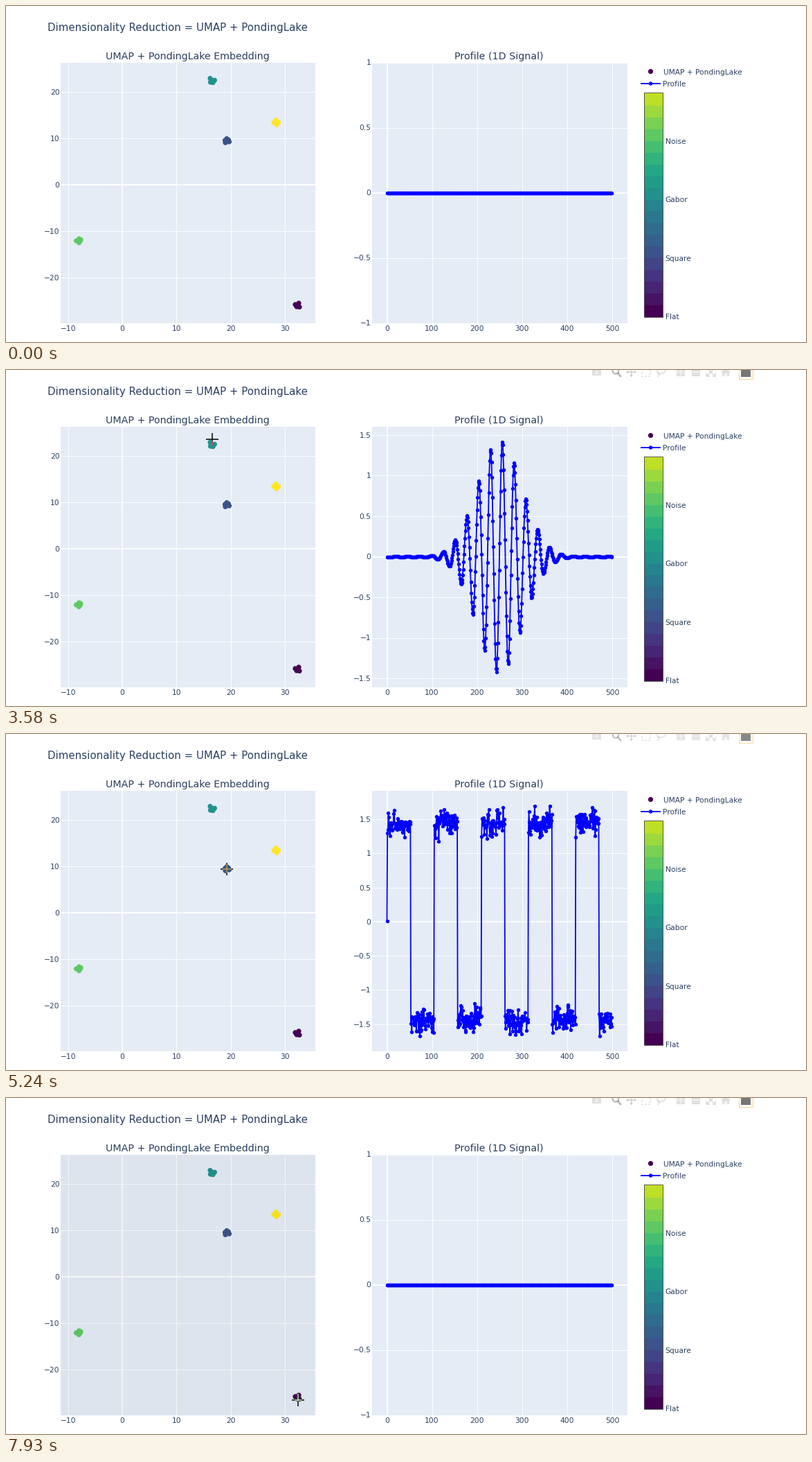
These frames come from a looping animation (1156 px wide and 485 px high, 8 s). A matplotlib script:

```python
import numpy as np
import matplotlib.pyplot as plt
from matplotlib.animation import FuncAnimation
from matplotlib.patches import Circle, Ellipse, Polygon, Rectangle
from matplotlib.path import Path

W, H, DPI = 1156, 485, 64  # a power of two keeps the pixel size exact
LOOP, STEP = 8000, 40
PT = 72 / DPI
INK, PANEL = "#2a3f5f", "#e5ecf6"
TOP, BOTTOM = 81.5, 457.5
LEFT = (78.5, 447)
RIGHT = (529, 897.5)
METHOD = "UMAP + PondingLake"
viridis = plt.get_cmap("viridis")

fig = plt.figure(figsize=(W / DPI, H / DPI), dpi=DPI, facecolor="white")
ax = fig.add_axes([0, 0, 1, 1])
ax.set_xlim(0, W)
ax.set_ylim(H, 0)
ax.axis("off")


def text(x, y, s, size=10.6, ha="left", color=INK, font="DejaVu Sans", z=5):
    """Text whose capitals are centred on y; size in pixels."""
    return ax.text(x, y + 0.365 * size, s, fontsize=size * PT, ha=ha,
                   va="baseline", color=color, family=font, zorder=z)


def line(xs, ys, width=0.9, color="white", z=1, **kw):
    return ax.plot(xs, ys, color=color, lw=width * PT, zorder=z, **kw)[0]


def box(x0, y0, x1, y1, z=0, **kw):
    return ax.add_patch(Rectangle((x0, y0), x1 - x0, y1 - y0, zorder=z, **kw))


def number(v):
    return f"{v:g}".replace("-", "\u2212")


def grid_width(v):
    return 1.8 if v == 0 else 0.9


# Panels, fixed grid and titles
def embed_xy(x, y):
    return 168 + 7.83 * x, 258 - 6.7 * y


for x0, x1 in (LEFT, RIGHT):
    box(x0, TOP, x1, BOTTOM, color=PANEL, lw=0)
for v in range(-10, 31, 10):
    x = embed_xy(v, 0)[0]
    line([x, x], [TOP, BOTTOM], grid_width(v))
    text(x, 465.5, number(v), ha="center")
for v in range(-20, 21, 10):
    y = embed_xy(0, v)[1]
    line(LEFT, [y, y], grid_width(v))
    text(77.5, y, number(v), ha="right")
for v in range(0, 501, 100):
    x = 550.5 + 0.651 * v
    line([x, x], [TOP, BOTTOM], grid_width(v))
    text(x, 465.5, number(v), ha="center")

text(60.5, 31, f"Dimensionality Reduction = {METHOD}", 15.05)
text(262.5, 72, f"{METHOD} Embedding", 14.2, "center")
text(712.5, 72, "Profile (1D Signal)", 14.2, "center")

# Legend and colour bar
ax.add_patch(Circle((931.5, 94.5), 3.6, color=viridis(0.0), lw=0))
text(949.5, 95, METHOD)
line([918, 945], [112, 112], 1.8, "blue")
ax.add_patch(Circle((931.5, 112), 2.7, color="blue", lw=0, zorder=2))
text(949.5, 112, "Profile")
BAR_TOP, BAR_BOTTOM, UNIT = 124.5, 448.5, 84.5
for i in range(20):
    low = BAR_BOTTOM - i * UNIT / 5
    box(922, max(low - UNIT / 5, BAR_TOP), 949, low, color=viridis(i / 20), lw=0)
box(922, BAR_TOP, 949, BAR_BOTTOM, 1, fill=False, ec="#444444", lw=0.9 * PT)
for i, name in enumerate(["Flat", "Square", "Gabor", "Noise"]):
    text(952.5, BAR_BOTTOM - i * UNIT, name)

# Embedding clusters
CLUSTERS = [
    [(418, 431), (423, 429), (421, 432), (420, 434), (424, 434.5)],
    [(319, 191.5), (316.5, 194), (317, 197.3), (322.5, 196), (321.5, 193.3)],
    [(295, 104.5), (301.4, 107.2), (295.5, 110), (299, 110.6), (297.5, 107)],
    [(101.5, 339), (105.5, 336), (108, 337.3), (105.5, 341.7), (107, 339.5)],
    [(390, 164.8), (387, 168.2), (393.5, 168), (391, 171.4)],
]
cursor_lines = []
for i, points in enumerate(CLUSTERS):
    color = np.array(viridis(i / 4)[:3])
    shape = Path.make_compound_path(*[Path.circle(p, 3.6) for p in points])
    for p in points:
        ax.add_patch(Circle(p, 3.6, color=color, lw=0, zorder=3))
    # The crosshair shows inverted over the points
    for axis in "hv":
        part = line([], [], 1.5, 1 - color, 21, solid_capstyle="butt")
        part.set_clip_path(shape, ax.transData)
        cursor_lines.append((axis, part))
for axis in "hv":
    cursor_lines.append((axis, line([], [], 1.5, "black", 20, solid_capstyle="butt")))
tint = box(LEFT[0], TOP, LEFT[1], BOTTOM, 6, color="black", alpha=0.03, lw=0)

# Tool bar, cut by the top edge
toolbar = []


def icon(artist, alpha=0.3):
    toolbar.append((artist, alpha))


def icon_line(xs, ys, width=2, alpha=0.3):
    icon(line(xs, ys, width, "#444444", 10), alpha)


def icon_box(x0, y0, x1, y1, color="#444444", alpha=0.3, **kw):
    icon(box(x0, y0, x1, y1, 10, color=color, **kw), alpha)


icon_box(847, -1, 860, 8, lw=0)
icon(ax.add_patch(Circle((853.5, 3.5), 2.7, color="white", lw=0, zorder=11)), 1)
icon(ax.add_patch(Circle((881, 1.5), 4.2, fill=False, ec="#444444",
                         lw=2.2 * PT, zorder=10)), 0.7)
icon_line([884.5, 888], [5, 9], 2.6, 0.7)
icon_line([897, 910], [3, 3])
icon_line([903.5, 903.5], [-3, 9])
for dx, dy in ((-1, 0), (1, 0), (0, 1)):
    tip = np.array([903.5 + 7 * dx, 3 + 7 * dy])
    back = tip - 3 * np.array([dx, dy])
    side = 2.6 * np.array([dy, dx])
    icon(ax.add_patch(Polygon([tip, back + side, back - side], color="#444444",
                              lw=0, zorder=10)))
icon_box(919, -3, 931, 8.5, fill=False, lw=1.8 * PT, ls=(0, (1.6, 1.2)))
icon(ax.add_patch(Ellipse((947, 1), 12, 8, angle=-15, fill=False, ec="#444444",
                          lw=1.8 * PT, zorder=10)))
icon_line([942.5, 944, 942], [4, 6.5, 9.5], 1.6)
for cx in (975, 996.5):
    icon_box(cx - 6, -3, cx + 6, 9, lw=0)
    icon(line([cx - 4, cx + 4], [3, 3], 2, "white", 11), 1)
icon(line([975, 975], [-1, 7], 2, "white", 11), 1)
icon_line([1013, 1024], [-2.5, 8.5], 1.8)
icon_line([1013, 1024], [8.5, -2.5], 1.8)
icon_line([1012, 1012, 1015.5], [5, 9, 9], 1.8)
icon_line([1021.5, 1025, 1025], [9, 9, 5], 1.8)
icon(ax.add_patch(Polygon([(1033, 3), (1040, -3), (1047, 3), (1045, 3), (1045, 9),
                           (1041.5, 9), (1041.5, 5), (1038.5, 5), (1038.5, 9),
                           (1035, 9), (1035, 3)], color="#444444", lw=0, zorder=10)))
icon_box(1061.5, -4, 1075.5, 10, "black", 1, lw=0)
icon_box(1058.5, -8, 1078.5, 13, "#f2b544", 1, fill=False, lw=1.1 * PT)

# Signals: samples with the value range they fill
T = np.linspace(0, 1, 500)
rng = np.random.default_rng(7)


def gabor(amp, cycles):
    u = T - 0.5
    y = amp * np.exp(-u**2 / (2 * 0.1**2)) * np.sin(2 * np.pi * cycles * u)
    return y, y.min(), y.max()


def noisy(base, sigma, low, high):
    return np.clip(base + rng.normal(0, sigma, T.size), low, high), low, high


FLAT = (0 * T, -1, 1)
SINE = noisy(1.45 * np.sin(2 * np.pi * 0.65 * T), 0.12, -1.34, 1.69)
SQUARE = noisy(1.45 * np.sign(np.sin(2 * np.pi * 4.77 * T)), 0.1, -1.67, 1.7)
SQUARE[0][0] = 0.015

# Redraw times; each redraw fades the tool bar in again
REDRAWS = [(720, FLAT), (1670, gabor(1.143, 14)), (2520, gabor(1.3, 17)),
           (3400, gabor(1.43, 19)), (4100, SINE), (5100, SQUARE),
           (6280, FLAT), (7760, FLAT)]

# Hover labels: start, end, category, index, x, y
HOVERS = [
    (1180, 1670, "Gabor", 23, 16.42, 22.51),
    (2150, 2520, "Gabor", 29, 16.94, 22.13),
    (2840, 3400, "Gabor", 21, 16.31, 22.86),
    (3840, 4100, "Sine", 42, 28.42, 13.61),
    (4390, 4670, "Sine", 45, 27.90, 13.26),
    (4800, 5100, "Square", 14, 19.64, 9.47),
    (5250, 5470, "Square", 17, 19.31, 9.83),
    (6130, 6280, "Flat", 5, 32.18, -25.84),
    (6480, 6700, "Flat", 3, 32.57, -26.02),
    (7400, 7760, "Flat", 8, 32.44, -26.31),
]
SHADE = {"Flat": 0.0, "Square": 0.25, "Gabor": 0.5, "Sine": 1.0}

# Crosshair stops: time, x, y
STOPS = np.array([
    (720, 1092, 476), (1200, 296, 108), (2150, 296, 108), (2320, 301, 112),
    (2360, 301, 112), (2560, 303, 106), (2900, 297, 108), (3400, 296, 104),
    (3550, 298, 100), (3600, 298, 100), (3720, 371, 150), (3840, 388, 166),
    (4100, 388, 168), (4500, 384, 170), (4600, 350, 176), (4620, 350, 176),
    (4800, 321, 192), (5300, 319, 195), (5400, 336, 225), (5800, 405, 390),
    (6040, 419, 425), (6080, 419, 425), (6200, 421, 431), (6680, 421, 432),
    (7030, 154, 345), (7160, 394, 393), (7180, 394, 393), (7340, 420, 431),
    (7700, 422, 436), (8000, 422, 436)])

profile = line([], [], 1.8, "blue", 4, marker="o", ms=5.4 * PT, mew=0)
LEVELS = np.arange(-4, 5) / 2
levels = [(v, line(RIGHT, [0, 0], grid_width(v)), text(527.5, 0, number(v), ha="right"))
          for v in LEVELS]
hover_box = ax.add_patch(Polygon([(0, 0), (1, 1), (0, 1)], zorder=15, lw=0.9 * PT))
hover_rows = [text(0, 0, "", 11.5, font="Liberation Sans", z=16) for _ in range(3)]


def show_profile(signal):
    y, low, high = signal
    top, bottom = (TOP, BOTTOM) if signal is FLAT else (103.5, 435.5)

    def to_px(v):
        return bottom - (v - low) / (high - low) * (bottom - top)

    profile.set_data(550.5 + 0.651 * np.arange(T.size), to_px(y))
    for v, rule, label in levels:
        py = to_px(v)
        inside = TOP - 0.1 <= py <= BOTTOM + 0.1
        rule.set_visible(inside)
        label.set_visible(inside)
        rule.set_ydata([py, py])
        label.set_y(py + 0.365 * 10.6)


def show_hover(t):
    current = next((h for h in HOVERS if h[0] <= t < h[1]), None)
    for part in [hover_box, *hover_rows]:
        part.set_visible(current is not None)
    if current is None:
        return
    _, _, name, index, vx, vy = current
    x, y = embed_xy(vx, vy)
    tip, x0, x1 = x + 3.5, x + 9, x + 107.8
    hover_box.set_xy([(tip, y), (x0, y - 5.3), (x0, y - 23.8), (x1, y - 23.8),
                      (x1, y + 23.8), (x0, y + 23.8), (x0, y + 5.3)])
    ink = "#444444" if name == "Sine" else "white"
    hover_box.set_facecolor(viridis(SHADE[name]))
    hover_box.set_edgecolor(ink)
    rows = [f"Category: {name}", f"Index: {index}",
            f"X: {vx:.2f}, Y: {vy:.2f}".replace("-", "\u2212")]
    for k, (row, s) in enumerate(zip(hover_rows, rows)):
        row.set_text(s)
        row.set_color(ink)
        row.set_position((x0 + 2.8, y + 15 * (k - 1) + 4.3))


def show_cursor(t):
    k = np.clip(np.searchsorted(STOPS[:, 0], t, "right") - 1, 0, len(STOPS) - 2)
    (t0, *p0), (t1, *p1) = STOPS[k], STOPS[k + 1]
    p0, p1 = np.array(p0), np.array(p1)
    u = np.clip((t - t0) / (t1 - t0), 0, 1)
    x, y = p0 + (p1 - p0) * u * u * (3 - 2 * u)
    for axis, part in cursor_lines:
        part.set_visible(t >= 720)
        if axis == "h":
            part.set_data([x - 9, x + 9], [y, y])
        else:
            part.set_data([x, x], [y - 9, y + 9])


def update(frame):
    t = frame * STEP
    start, signal = next((r for r in reversed(REDRAWS) if r[0] <= t), (t, FLAT))
    show_profile(signal)
    fade = min(1, (t - start) / 300)
    for part, alpha in toolbar:
        part.set_alpha(alpha * fade)
    tint.set_visible(t >= REDRAWS[-1][0])
    show_hover(t)
    show_cursor(t)
    return []


anim = FuncAnimation(fig, update, frames=LOOP // STEP, interval=STEP,
                     init_func=lambda: update(0), repeat=True, repeat_delay=0)
plt.show()
```
